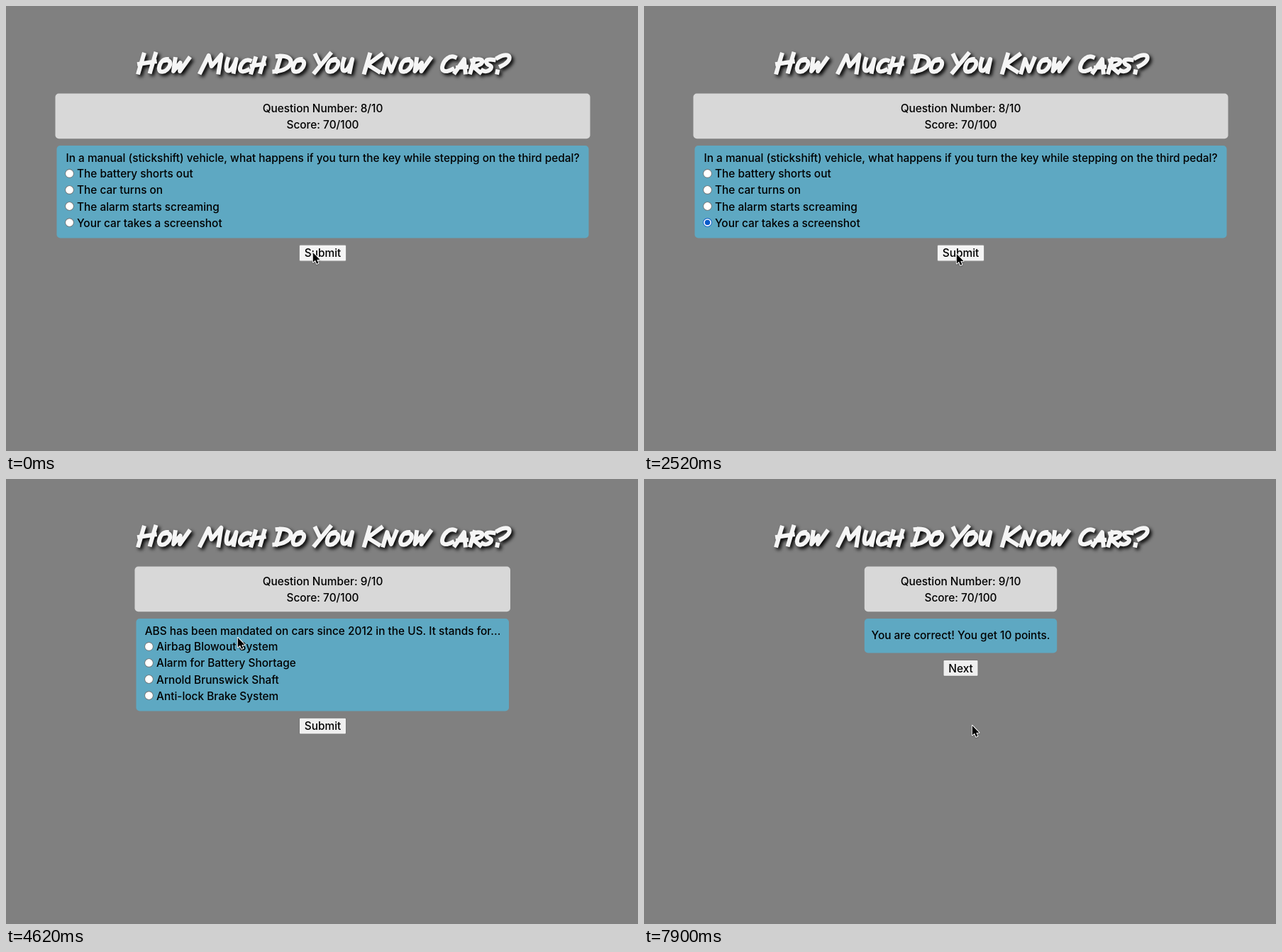
An HTML page with a canvas that plays this animation: 891x628 px, repeating every 8 s.

```html
<!DOCTYPE html>
<html lang="en">
<head>
<meta charset="utf-8">
<title>Car quiz</title>
<style>
  html, body { margin: 0; width: 100%; height: 100%; overflow: hidden; background: #808080; }
  canvas { display: block; }
</style>
</head>
<body>
<canvas id="stage" width="891" height="628" aria-label="How Much Do You Know Cars?"></canvas>
<script>
const ctx = document.getElementById('stage').getContext('2d');
const LOOP = 8000, STEP = 148.7, MID = 446.5;
const BLUE = '#5ea8c2', RED = '#c53b3b';
const FONT = '500 15.4px Inter, sans-serif';

// Marker capitals: advance and pen path on a 24 unit high cell
const glyphs = {
  H: [26.5, 'M4 1L2 24M18 0L16 23M1 13L19 10'],
  O: [23.7, 'M11 2C0 2 -2 24 8 23C19 22 22 1 9 4'],
  W: [26, 'M2 2L3 22L11 8L13 22L23 1'],
  M: [30, 'M0 24L6 2L12 16L21 1L22 24'],
  U: [24.3, 'M3 2C0 30 14 26 16 2L16 23'],
  C: [20.5, 'M15 4C1 -2 -5 32 15 20'],
  D: [23, 'M5 3L3 23M1 3C25 0 24 22 1 23'],
  Y: [19, 'M2 2L9 13M19 0L5 24'],
  K: [25, 'M4 1L2 24M18 1L4 14L19 23'],
  N: [28, 'M2 24L4 2L14 22L18 1'],
  A: [23.5, 'M0 24L10 2L16 24M3 16L16 15'],
  R: [22, 'M4 2L2 24M1 4C22 -3 22 13 4 14L17 24'],
  S: [17, 'M14 3C-4 0 4 11 9 12C18 16 8 26 0 21'],
  '?': [20, 'M3 5C18 -5 23 9 9 16M6 23L6 24']
};
const words = [['How', 184.5], ['Much', 274], ['Do', 377], ['You', 429.5], ['Know', 503], ['Cars?', 611]];

const title = new Path2D();
for (const [word, start] of words) {
  let x = start;
  for (const ch of word) {
    const [advance, pen] = glyphs[ch.toUpperCase()];
    const size = /[A-Z?]/.test(ch) ? 1.08 : 0.84;
    const base = 93.6 - 24 * size;
    title.addPath(new Path2D(pen), new DOMMatrix([size * 1.08, 0, -0.2 * size, size, x + 4.8 * size, base]));
    x += advance * size;
  }
}

const quiz = {
  first: {
    number: 8, left: 71.5, right: 821.5,
    ask: 'In a manual (stickshift) vehicle, what happens if you turn the key while stepping on the third pedal?',
    options: ['The battery shorts out', 'The car turns on', 'The alarm starts screaming', 'Your car takes a screenshot']
  },
  second: {
    number: 9, left: 183.5, right: 709,
    ask: 'ABS has been mandated on cars since 2012 in the US. It stands for...',
    options: ['Airbag Blowout System', 'Alarm for Battery Shortage', 'Arnold Brunswick Shaft', 'Anti-lock Brake System']
  }
};

// Pointer keys: step, x, y
const route = [
  [0, 432, 347], [4, 432, 347], [5, 405, 340], [6, 330, 322], [7, 230, 312], [8, 150, 308],
  [10, 99, 312], [12, 99, 312], [13, 130, 318], [15, 390, 347], [16, 440, 349], [19, 440, 349],
  [20, 441, 343], [22, 444, 281], [23, 445, 272], [28, 445, 272], [29, 425, 261], [31, 326, 223],
  [32, 300, 192], [33, 284, 178], [35, 280, 196], [38, 226, 246], [40, 210, 278], [42, 203, 301],
  [44, 203, 301], [46, 290, 322], [48, 440, 351], [49, 471, 352], [51, 463, 349], [53, 462, 347]
];

function box(x, y, right, bottom, r, fill) {
  ctx.beginPath();
  ctx.roundRect(x, y, right - x, bottom - y, r);
  ctx.fillStyle = fill;
  ctx.fill();
}

function text(str, x, y, align = 'left', color = '#000', font = FONT) {
  ctx.font = font;
  ctx.textAlign = align;
  ctx.fillStyle = color;
  ctx.fillText(str, x, y);
}

function disc(x, y, r, fill) {
  ctx.beginPath();
  ctx.arc(x, y, r, 0, Math.PI * 2);
  ctx.fillStyle = fill;
  ctx.fill();
}

function drawTitle() {
  ctx.save();
  ctx.shadowColor = '#000';
  ctx.shadowBlur = 5;
  ctx.shadowOffsetX = ctx.shadowOffsetY = 3;
  ctx.strokeStyle = '#f5f5f5';
  ctx.lineWidth = 6;
  ctx.lineCap = 'square';
  ctx.lineJoin = 'round';
  ctx.stroke(title);
  ctx.restore();
}

function drawScore(number, left, right) {
  box(left, 123.6, right, 187.2, 5, '#d8d8d8');
  text(`Question Number: ${number}/10`, MID, 149.5, 'center');
  text('Score: 70/100', MID, 172.5, 'center');
}

function drawButton(label, half, top, state) {
  const edge = { idle: '#767676', hover: '#4f4f4f', active: '#8d8d8d' }[state];
  const face = { idle: '#efefef', hover: '#e5e5e5', active: '#f5f5f5' }[state];
  box(MID - half - 0.5, top - 0.5, MID + half + 0.5, top + 23.3, 2.5, edge);
  box(MID - half + 0.5, top + 0.5, MID + half - 0.5, top + 22.3, 1, face);
  text(label, MID, top + 17, 'center');
}

function drawRadio(x, y, state) {
  const ring = state === 'checked' ? '#0a5bcb' : state === 'pressed' ? '#6b6b6b' : '#767676';
  disc(x, y, 6.3, ring);
  disc(x, y, 5.4, state === 'pressed' ? '#e2e2e2' : '#fff');
  if (state === 'checked') disc(x, y, 3.8, ring);
}

function drawQuestion(q, picked, button) {
  drawScore(q.number, q.left - 2, q.right + 2);
  box(q.left, 197, q.right, 327.5, 5, BLUE);
  text(q.ask, MID, 219.5, 'center');
  q.options.forEach((option, i) => {
    const y = 236.4 + i * 23.05;
    drawRadio(q.left + 18, y, i === 3 ? picked : 'off');
    text(option, q.left + 28.5, y + 6);
  });
  drawButton('Submit', 33, 337.3, button);
}

function drawAnswer(number, half, bottom, message, fill, color, button) {
  drawScore(number, MID - half, MID + half);
  box(MID - half, 197, MID + half, bottom, 5, fill);
  text(message, MID, bottom - 20, 'center', color);
  drawButton('Next', 24.5, bottom + 10, button);
}

function drawHint(alpha) {
  ctx.save();
  ctx.globalAlpha = alpha;
  ctx.beginPath();
  ctx.roundRect(-6, 251, 265, 38.5, 4);
  ctx.moveTo(80, 251.5);
  ctx.lineTo(89.5, 243);
  ctx.lineTo(99, 251.5);
  ctx.shadowColor = 'rgba(0,0,0,.45)';
  ctx.shadowBlur = 5;
  ctx.shadowOffsetY = 1;
  ctx.fillStyle = '#fff';
  ctx.fill();
  ctx.shadowColor = 'transparent';
  box(6, 259, 27, 280.5, 2, '#ff9e0b');
  box(15.2, 263, 17.8, 272, 0.5, '#fff');
  box(15.2, 274, 17.8, 276.6, 0.5, '#fff');
  text('Please select one of these options.', 35, 274.5, 'left', '#000', '400 13px Inter, sans-serif');
  ctx.restore();
}

const arrow = new Path2D('M0 0V13.6L3.2 10.7L5.3 15.8L7.6 14.8L5.5 9.9H9.7Z');
const beam = new Path2D('M-3 -7.5Q0 -7.5 0 -5V5Q0 7.5 -3 7.5M3 -7.5Q0 -7.5 0 -5V5Q0 7.5 3 7.5M-2 2.5H2');

function drawPointer(step) {
  const next = route.findIndex(key => key[0] >= step);
  const b = route[next], a = route[Math.max(0, next - 1)];
  const k = b === a ? 0 : (step - a[0]) / (b[0] - a[0]);
  const overText = (step >= 7 && step <= 12) || (step >= 39 && step <= 41);
  ctx.save();
  ctx.translate(a[1] + (b[1] - a[1]) * k, a[2] + (b[2] - a[2]) * k);
  ctx.lineJoin = 'round';
  ctx.strokeStyle = '#fff';
  if (overText) {
    ctx.lineWidth = 2.8;
    ctx.stroke(beam);
    ctx.strokeStyle = '#000';
    ctx.lineWidth = 1.1;
    ctx.stroke(beam);
  } else {
    ctx.translate(0.8, 1);
    ctx.shadowColor = 'rgba(0,0,0,.3)';
    ctx.shadowBlur = 2;
    ctx.shadowOffsetY = 1;
    ctx.lineWidth = 1.9;
    ctx.stroke(arrow);
    ctx.shadowColor = 'transparent';
    ctx.fillStyle = '#000';
    ctx.fill(arrow);
  }
  ctx.restore();
}

function buttonState(step, ...spans) {
  const hit = spans.find(([from, to]) => step >= from && step <= to);
  return hit ? hit[2] : 'idle';
}

function draw(time) {
  const step = Math.min(53, Math.floor((time % LOOP) / STEP + 0.1));
  ctx.fillStyle = '#808080';
  ctx.fillRect(0, 0, 891, 628);
  drawTitle();
  if (step < 18) {
    const state = buttonState(step, [0, 0, 'active'], [1, 4, 'hover'], [16, 16, 'hover'], [17, 17, 'active']);
    drawQuestion(quiz.first, step >= 11 ? 'checked' : 'off', state);
    if (step >= 1 && step <= 10) drawHint(step === 1 ? 0.5 : 1);
  } else if (step < 25) {
    const state = buttonState(step, [23, 23, 'hover'], [24, 24, 'active']);
    drawAnswer(8, 210.5, 247.5, "Whoops, the right answer is actually 'The car turns on'.", RED, '#fff', state);
  } else if (step < 52) {
    const picked = step >= 43 ? 'checked' : step === 42 ? 'pressed' : 'off';
    const state = buttonState(step, [48, 50, 'hover'], [51, 51, 'active']);
    drawQuestion(quiz.second, picked, state);
  } else {
    drawAnswer(9, 135.7, 245.5, 'You are correct! You get 10 points.', BLUE, '#000', 'idle');
  }
  drawPointer(step);
}

const start = performance.now();
function tick() {
  draw(performance.now() - start);
  requestAnimationFrame(tick);
}
tick();
</script>
</body>
</html>
```
